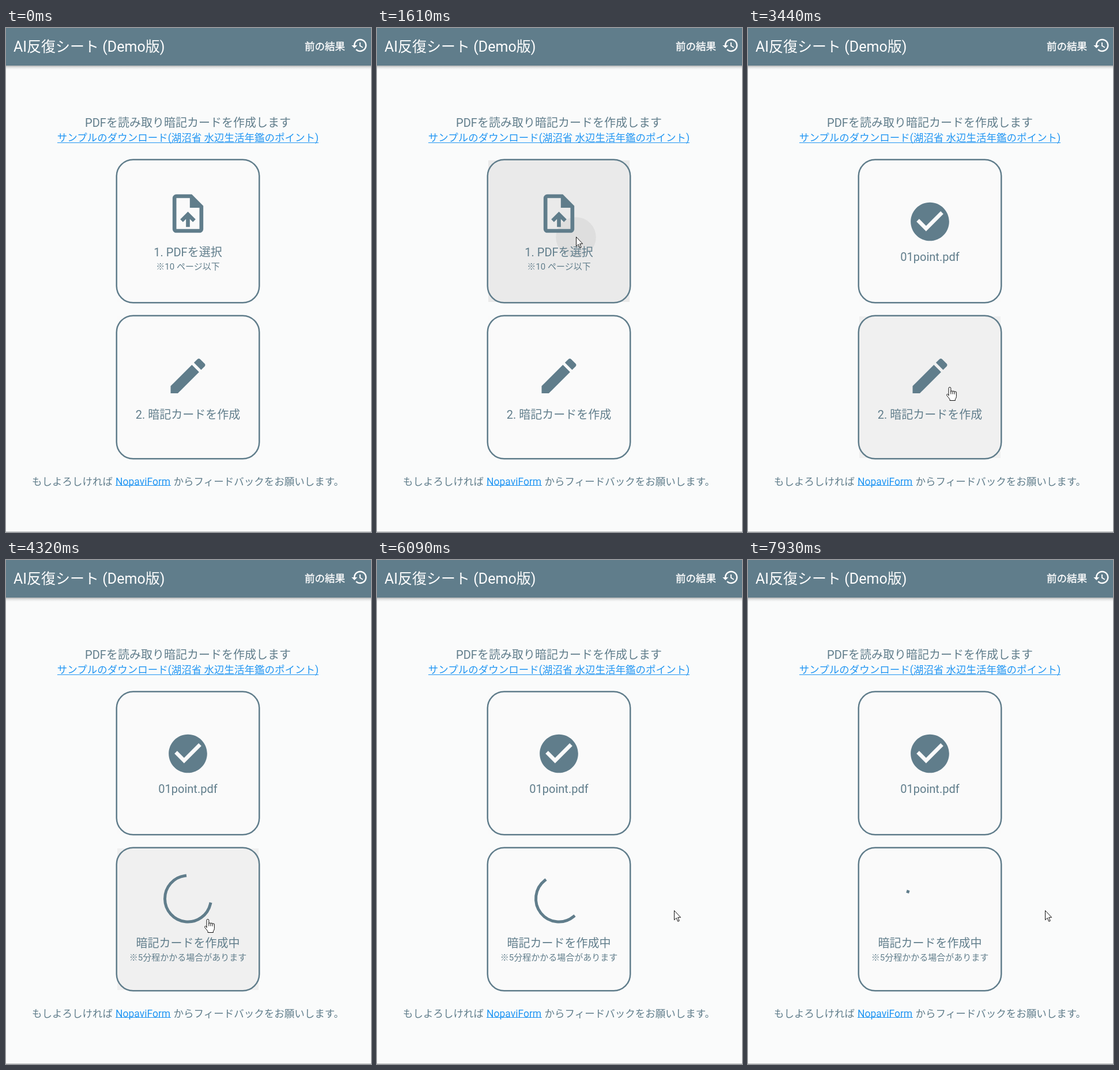
Animation of 633x872 px, one loop 8000 ms. Source, as an HTML page:

```html
<!DOCTYPE html>
<html lang="ja">
<head>
<meta charset="utf-8">
<title>AI反復シート</title>
<style>
  html, body { margin: 0; width: 100%; height: 100%; overflow: hidden; background: #fafbfb; }
  svg { display: block; width: 633px; height: 872px; }
  text { font: 20px Roboto, "Noto Sans CJK JP", "Noto Sans CJK", sans-serif; fill: #607d8b; white-space: pre; }
  .mid { text-anchor: middle; }
  .title { font-size: 25px; }
  .medium { font-size: 17.5px; }
  .small { font-size: 15px; }
  .cjk { font-family: "Noto Sans CJK JP", "Noto Sans CJK", sans-serif; }
  .link { fill: #2196f3; }
  .underline { stroke: #2196f3; stroke-width: 1; }
  .bar text, .bar path { fill: #fff; }
  .bar .strong { stroke: #fff; stroke-width: .35; }
  .slate { fill: #607d8b; }
  .border { fill: none; stroke: #607d8b; stroke-width: 2.5; }
  #cursor path { fill: #fff; stroke: #111; stroke-width: 1; stroke-linejoin: round; }
</style>
</head>
<body>
<svg viewBox="0 0 633 872">
  <defs>
    <linearGradient id="shade" x2="0" y2="1">
      <stop stop-color="#000" stop-opacity=".28"/>
      <stop offset=".5" stop-color="#000" stop-opacity=".08"/>
      <stop offset="1" stop-color="#000" stop-opacity="0"/>
    </linearGradient>
    <clipPath id="cardClip"><rect x="192" y="228" width="247" height="247" rx="28.75"/></clipPath>
  </defs>

  <rect width="633" height="872" fill="#fafbfb"/>
  <rect y="65" width="633" height="7" fill="url(#shade)"/>
  <g class="bar">
    <rect width="633" height="65" class="slate"/>
    <text x="13" y="41" class="title">AI反復シート (Demo版)</text>
    <text x="518" y="37.5" class="medium strong">前の結果</text>
    <path transform="translate(598 15) scale(1.25)" d="M13 3c-4.97 0-9 4.03-9 9H1l3.89 3.89.07.14L9 12H6c0-3.87 3.13-7 7-7s7 3.13 7 7-3.13 7-7 7c-1.93 0-3.68-.79-4.94-2.06l-1.42 1.42C8.27 19.99 10.51 21 13 21c4.97 0 9-4.03 9-9s-4.03-9-9-9zm-1 5v5l4.28 2.54.72-1.21-3.5-2.08V8H12z"/>
  </g>

  <text class="mid" x="315.5" y="170.5">PDFを読み取り暗記カードを作成します</text>
  <text class="mid medium link" x="315.5" y="195.5">サンプルのダウンロード(湖沼省 水辺生活年鑑のポイント)</text>
  <path class="underline" d="M89 198.5H542"/>

  <rect id="fill1" x="193" y="229" width="245" height="245"/>
  <rect id="fill2" x="193" y="499" width="245" height="245"/>
  <g clip-path="url(#cardClip)"><circle id="splash" cx="345" cy="362"/></g>
  <rect class="border" x="191.75" y="227.75" width="247.5" height="247.5" rx="28.75"/>
  <rect class="border" x="191.75" y="497.75" width="247.5" height="247.5" rx="28.75"/>

  <g id="choose">
    <path class="slate" transform="translate(275.5 281) scale(3.333)" d="M14 2H6c-1.1 0-1.99.9-1.99 2L4 20c0 1.1.89 2 1.99 2H18c1.1 0 2-.9 2-2V8l-6-6zm4 18H6V4h7v5h5v11zM8 15.01l1.41 1.41L11 14.84V19h2v-4.16l1.59 1.59L16 15.01 12.01 11z"/>
    <text class="mid" x="315.5" y="395">1. PDFを選択</text>
    <text class="mid small" x="315.5" y="418"><tspan class="cjk">※</tspan>10 ページ以下</text>
  </g>
  <g id="chosen">
    <path class="slate" transform="translate(275.5 295) scale(3.333)" d="M12 2C6.48 2 2 6.48 2 12s4.48 10 10 10 10-4.48 10-10S17.52 2 12 2zm-2 15l-5-5 1.41-1.41L10 14.17l7.59-7.59L19 8l-9 9z"/>
    <text class="mid" x="315.5" y="403">01point.pdf</text>
  </g>
  <g id="create">
    <path class="slate" transform="translate(275.5 562) scale(3.333)" d="M3 17.25V21h3.75L17.81 9.94l-3.75-3.75L3 17.25zM20.71 7.04c.39-.39.39-1.02 0-1.41l-2.34-2.34c-.39-.39-1.02-.39-1.41 0l-1.83 1.83 3.75 3.75 1.83-1.83z"/>
    <text class="mid" x="315.5" y="676">2. 暗記カードを作成</text>
  </g>
  <g id="creating">
    <path id="spinner" fill="none" stroke="#607d8b" stroke-width="5" stroke-linecap="square"/>
    <text class="mid" x="315.5" y="670">暗記カードを作成中</text>
    <text class="mid small" x="315.5" y="693"><tspan class="cjk">※</tspan>5分程かかる場合があります</text>
  </g>

  <text class="medium" x="45" y="790.5">もしよろしければ</text>
  <text class="medium link" x="190" y="790.5">NopaviForm</text>
  <path class="underline" d="M190 791.5H286"/>
  <text class="medium" x="290.5" y="790.5">からフィードバックをお願いします。</text>
  <rect y="871" width="633" height="1" fill="#b9bcbd"/>

  <g id="cursor">
    <path id="arrow" d="M.5 .5V16.8L4.2 13.3L6.8 19.3L9.2 18.3L6.7 12.3H11.6Z"/>
    <g id="hand">
      <path d="M-2 15V2.4a1.9 1.9 0 0 1 3.8 0V8.4a1.6 1.6 0 0 1 3.2 0a1.6 1.6 0 0 1 3.2 .8a1.6 1.6 0 0 1 3.2 .8V16.5Q11.2 19.5 9.4 21.2V23.5H0V21.5Q-2 18.5-5.2 14.8C-6.4 12.6-4 11.4-2 14Z"/>
      <path d="M1.8 8v4.5M5 8.5v4M8.2 9.2v3.5"/>
    </g>
  </g>
</svg>
<script>
const LOOP = 8000, CLICK = 1540, CHOSEN = 1850, CREATING = 3770;
const $ = id => document.getElementById(id);
const clamp = v => Math.min(1, Math.max(0, v));
const show = (id, on) => $(id).style.display = on ? '' : 'none';
const smooth = v => v * v * (3 - 2 * v);
const setGrey = (id, v) => $(id).setAttribute('fill', `rgb(${v},${v},${v})`);

// Pointer stops: time, x, y
const stops = [
  [590, 585, 836], [1190, 345, 361], [1800, 345, 361], [2150, 574, 447],
  [2810, 574, 447], [3440, 350, 621], [4620, 350, 621], [5300, 515, 606]
];

function pointerAt(t) {
  const i = stops.findIndex(s => s[0] > t);
  if (i < 1) return stops[i ? stops.length - 1 : 0].slice(1);
  const [t0, x0, y0] = stops[i - 1], [t1, x1, y1] = stops[i];
  const k = smooth((t - t0) / (t1 - t0));
  return [x0 + (x1 - x0) * k, y0 + (y1 - y0) * k];
}

// cubic-bezier(.4, 0, .2, 1)
function fastOutSlowIn(x) {
  if (x <= 0 || x >= 1) return clamp(x);
  let lo = 0, hi = 1, u;
  for (let i = 0; i < 24; i++) {
    u = (lo + hi) / 2;
    const v = 1 - u;
    if (1.2 * u * v * v + 0.6 * u * u * v + u ** 3 < x) lo = u; else hi = u;
  }
  return u * u * (3 - 2 * u);
}

// Material indeterminate progress: growing head, chasing tail, steady rotation
function spinnerPath(time) {
  const phase = time / 1333 % 1, turn = time / 2222 % 1;
  const head = fastOutSlowIn(phase * 2), tail = fastOutSlowIn(phase * 2 - 1);
  const start = Math.PI * (-0.5 + tail * 1.5 + turn * 2 + phase * 0.5);
  const sweep = Math.max((head - tail) * 1.5 * Math.PI, 0.003);
  const point = a => `${315.5 + 40 * Math.cos(a)} ${586 + 40 * Math.sin(a)}`;
  return `M${point(start)}A40 40 0 ${+(sweep > Math.PI)} 1 ${point(start + sweep)}`;
}

function draw(t) {
  const [x, y] = pointerAt(t);
  const inCard = top => x > 191 && x < 440 && y > top && y < top + 249;
  const visible = t >= 590, hover1 = visible && inCard(227), hover2 = visible && inCard(497);
  const picking = t >= CLICK + 40 && t < 2400;

  show('cursor', visible);
  $('cursor').setAttribute('transform', `translate(${x} ${y})`);
  const pointing = (hover1 || hover2) && !picking;
  show('hand', pointing);
  show('arrow', !pointing);

  const press = 6 * clamp((t - CLICK) / 70);
  setGrey('fill1', hover1 && t < CHOSEN ? 240 - press : 250);
  setGrey('fill2', hover2 ? 240 : 250);
  $('splash').setAttribute('r', Math.max(0, (t - CLICK) * 0.49));
  $('splash').setAttribute('fill-opacity', 0.05 * (1 - clamp((t - 1700) / 150)));

  show('choose', t < CHOSEN);
  show('chosen', t >= CHOSEN);
  show('create', t < CREATING);
  show('creating', t >= CREATING);
  $('spinner').setAttribute('d', spinnerPath(Math.max(0, (t - 3864) * 0.983)));
}

const begin = performance.now();
function tick() {
  draw((performance.now() - begin) % LOOP);
  requestAnimationFrame(tick);
}
tick();
</script>
</body>
</html>
```
